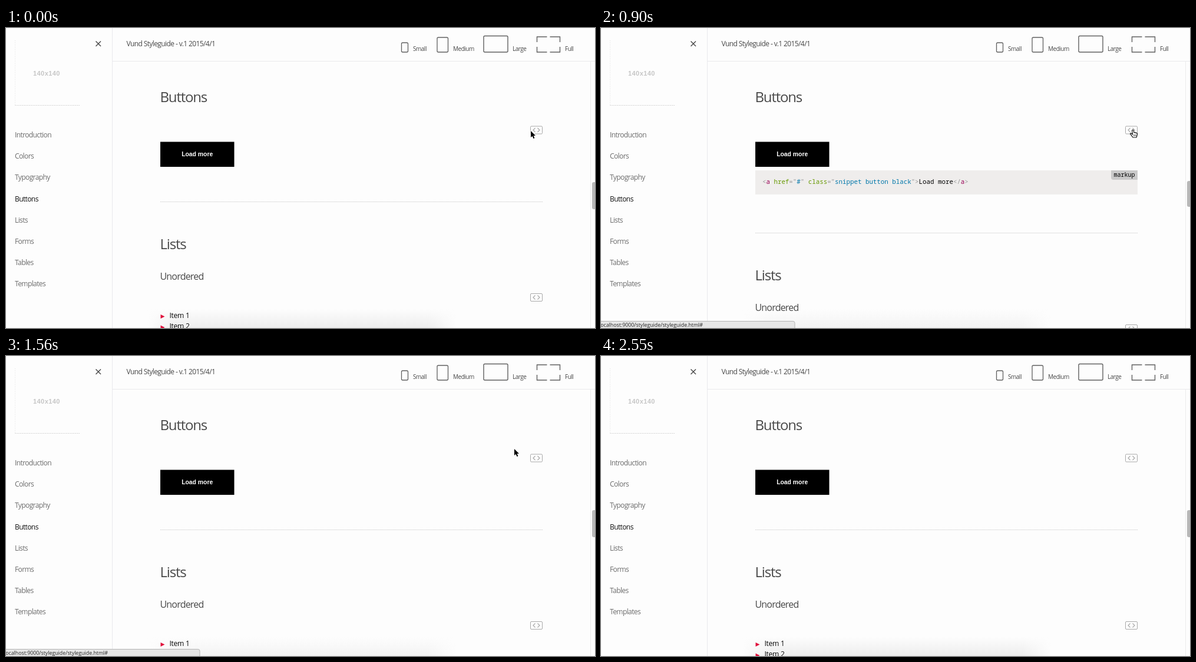
Animation of 1000 by 510 pixels, one loop 2.58 s. Source, as an HTML page with a canvas:

```html
<!DOCTYPE html>
<html lang="en">
<head>
<meta charset="utf-8">
<title>Styleguide</title>
<style>
  html, body { margin: 0; width: 100%; height: 100%; overflow: hidden; background: #fdfdfd; }
  canvas { display: block; }
</style>
</head>
<body>
<canvas id="stage" width="1000" height="510"></canvas>
<script>
const W = 1000, H = 510, LOOP = 2580, STEP = 30;
const OPEN = 450, CLOSE = 1410;
const STATUS_IN = 150, STATUS_OUT = 1680, FADE = 120;
const PANEL_SHIFT = 53;
const UI = '"Open Sans", "Noto Sans", sans-serif';
const ARIAL = '"Liberation Sans", Arial, sans-serif';
const MONO = '"Noto Sans Mono", "DejaVu Sans Mono", monospace';
const PAGE = '#fdfdfd', LINE = '#e9e9ec', INK = '#484848';

// time, x, y of the pointer's hot spot
const POINTER = [
  [0, 891, 175], [90, 898, 174], [360, 900, 173], [900, 903, 173],
  [1260, 900, 172], [1470, 897, 171], [1560, 863, 158],
  [1620, 842, 88], [1680, 826, -20]
];

const ctx = document.getElementById('stage').getContext('2d');

const clamp = v => Math.min(1, Math.max(0, v));

function box(x, y, w, h, color) {
  ctx.fillStyle = color;
  ctx.fillRect(x, y, w, h);
}

function text(str, x, y, size, color, { font = UI, weight = 400, track = -0.05, align = 'left' } = {}) {
  ctx.font = `${weight} ${size}px ${font}`;
  ctx.letterSpacing = `${track * size}px`;
  ctx.textAlign = align;
  ctx.fillStyle = color;
  ctx.fillText(str, x, y);
}

function line(points, color, width = 1, dash = []) {
  ctx.beginPath();
  points.forEach(([x, y]) => ctx.lineTo(x, y));
  ctx.setLineDash(dash);
  ctx.strokeStyle = color;
  ctx.lineWidth = width;
  ctx.stroke();
  ctx.setLineDash([]);
}

function frame(x, y, w, h, r, color, width) {
  ctx.beginPath();
  ctx.roundRect(x, y, w, h, r);
  ctx.strokeStyle = color;
  ctx.lineWidth = width;
  ctx.stroke();
}

function drawSidebar() {
  line([[180.5, 0], [180.5, H]], LINE);
  line([[15.5, 21], [15.5, 131]], '#e2e2e2', 1, [1, 2]);
  line([[15, 131.5], [125, 131.5]], '#d6d6d6', 1, [2, 1]);
  text('140x140', 46, 80.5, 11, '#c6c6c6', { font: ARIAL, weight: 700, track: 0.04 });
  line([[152.5, 22.5], [161, 31]], INK, 1.4);
  line([[161, 22.5], [152.5, 31]], INK, 1.4);
  ['Introduction', 'Colors', 'Typography', 'Buttons', 'Lists', 'Forms', 'Tables', 'Templates']
    .forEach((name, i) => {
      const active = name === 'Buttons';
      text(name, 15, 186 + i * 36.2, 12, active ? '#111' : '#6c6c6c', { weight: active ? 500 : 400 });
    });
}

function drawHeader() {
  line([[181, 56.5], [W, 56.5]], LINE);
  text('Vund Styleguide - v.1 2015/4/1', 204.5, 31, 12, INK);
  const edge = '#606060';
  frame(671.5, 25, 11, 16, 2, edge, 1.3);
  frame(732, 16, 18.5, 25, 2, edge, 1.3);
  frame(811, 13.5, 41, 27.5, 2, edge, 1.4);
  for (const [x, dx] of [[901.5, 1], [940.5, -1]]) {
    for (const [y, dy] of [[15, 1], [41, -1]]) {
      line([[x + dx * 17, y], [x, y], [x, y + dy * 9]], edge, 1.4);
    }
  }
  [['Small', 691], ['Medium', 759], ['Large', 860], ['Full', 949]]
    .forEach(([name, x]) => text(name, x, 38.5, 10, INK));
}

function drawGlow(strength) {
  const down = ctx.createLinearGradient(0, 478, 0, H);
  down.addColorStop(0, 'rgba(226,226,226,0)');
  down.addColorStop(1, `rgba(226,226,226,${0.6 * strength})`);
  box(240, 478, 525, 32, down);
  // soften both ends into the page colour
  for (const [from, to] of [[240, 290], [765, 715]]) {
    const side = ctx.createLinearGradient(from, 0, to, 0);
    side.addColorStop(0, PAGE);
    side.addColorStop(1, 'rgba(253,253,253,0)');
    box(Math.min(from, to), 478, Math.abs(to - from), 32, side);
  }
}

function drawCodeIcon(y) {
  const gray = '#a9a9a9';
  frame(890.5, y - 6.5, 20, 13, 1.5, gray, 1);
  line([[898.5, y - 3.5], [895, y], [898.5, y + 3.5]], gray, 1.2);
  line([[902.5, y - 3.5], [906, y], [902.5, y + 3.5]], gray, 1.2);
}

function drawPanel() {
  box(262, 242, 649, 41, '#efedec');
  ctx.beginPath();
  ctx.roundRect(866, 242, 45, 16, [0, 0, 0, 4]);
  ctx.fillStyle = '#c9c9c9';
  ctx.fill();
  text('markup', 870.5, 253, 10, '#000', { font: MONO, track: 0 });

  const punct = '#999', tag = '#990055', attr = '#669900', value = '#0077aa';
  const parts = [
    ['<', punct], ['a', tag], [' href', attr], ['="', punct], ['#', value], ['"', punct],
    [' class', attr], ['="', punct], ['snippet button black', value], ['">', punct],
    ['Load more', '#000'], ['</', punct], ['a', tag], ['>', punct]
  ];
  let x = 274;
  for (const [str, color] of parts) {
    text(str, x, 264.5, 10.8, color, { font: MONO, track: 0 });
    x += ctx.measureText(str).width;
  }
}

function drawContent(open) {
  const shift = open ? PANEL_SHIFT : 0;
  text('Buttons', 261.5, 126, 24, INK);
  drawCodeIcon(173.5);
  box(262, 193.5, 125.5, 42.5, '#000');
  text('Load more', 324.7, 218, 10.4, '#fff', { font: ARIAL, weight: 700, track: 0, align: 'center' });
  if (open) drawPanel();

  line([[262, 295.5 + shift], [911, 295.5 + shift]], '#c6c6c6', 1, [1, 1]);
  text('Lists', 261.5, 376 + shift, 24, INK);
  text('Unordered', 261.5, 428 + shift, 16, INK);
  drawCodeIcon(458 + shift);
  for (let i = 0; i < 2; i++) {
    const y = 490.5 + shift + i * 18.5;
    ctx.beginPath();
    ctx.moveTo(262.5, y - 3.5);
    ctx.lineTo(269.5, y);
    ctx.lineTo(262.5, y + 3.5);
    ctx.fillStyle = '#e0103c';
    ctx.fill();
    text('Item ' + (i + 1), 277.5, y + 2.3, 12.2, '#080808', { track: -0.025 });
  }
}

function drawScrollbar(open) {
  line([[992.5, 56], [992.5, H]], '#ececec');
  ctx.beginPath();
  ctx.roundRect(995, open ? 260 : 262, 7, open ? 44 : 46, 3);
  ctx.fillStyle = '#b8b8b8';
  ctx.fill();
}

function drawStatus(alpha) {
  ctx.globalAlpha = alpha;
  ctx.beginPath();
  ctx.roundRect(-2, 498.5, 331, 14, [0, 3, 0, 0]);
  ctx.fillStyle = '#e6e6e6';
  ctx.fill();
  ctx.strokeStyle = '#b4b4b4';
  ctx.lineWidth = 1;
  ctx.stroke();
  text('localhost:9000/styleguide/styleguide.html#', 173, 508, 8.8, '#222', { track: 0, align: 'right' });
  ctx.globalAlpha = 1;
}

function pointerAt(t) {
  const i = POINTER.findIndex(p => p[0] > t);
  if (i < 0) return null;
  const [t0, x0, y0] = POINTER[i - 1], [t1, x1, y1] = POINTER[i];
  const k = (t - t0) / (t1 - t0);
  return [x0 + (x1 - x0) * k, y0 + (y1 - y0) * k];
}

const ARROW = new Path2D('M0 0V11L2.6 8.7L4.5 13L6.4 12.2L4.6 8H8Z');
const HAND = new Path2D(
  'M-1.4 1Q0 -1 1.2 1L2 5Q3.2 3.9 4 5.2Q5.2 4.2 6 5.8Q7.6 5.2 7.6 7.2' +
  'L7 10L6 13H0L-2.6 9.4L-4.4 7.2Q-4.2 5 -2 6.6L-0.4 8Z'
);

function drawPointer(t) {
  const at = pointerAt(t);
  if (!at) return;
  const [x, y] = at;
  const hover = x > 892 && y > 166;
  ctx.save();
  ctx.translate(x, y);
  ctx.lineJoin = 'round';
  if (hover) {
    ctx.fillStyle = '#fff';
    ctx.fill(HAND);
    ctx.strokeStyle = '#111';
    ctx.lineWidth = 1.2;
    ctx.stroke(HAND);
    for (const dx of [1.6, 3.4, 5.2]) line([[dx, 8], [dx, 10.8]], '#111', 0.7);
  } else {
    ctx.strokeStyle = '#fff';
    ctx.lineWidth = 1.6;
    ctx.stroke(ARROW);
    ctx.fillStyle = '#000';
    ctx.fill(ARROW);
  }
  ctx.restore();
}

function draw(now) {
  const t = Math.floor((now % LOOP) / STEP) * STEP;
  const open = t >= OPEN && t < CLOSE;
  const status = clamp((t - STATUS_IN) / FADE) * clamp((STATUS_OUT + FADE - t) / FADE);
  box(0, 0, W, H, PAGE);
  drawGlow(1 - 0.4 * status);
  drawSidebar();
  drawHeader();
  drawContent(open);
  drawScrollbar(open);
  if (status > 0) drawStatus(status);
  drawPointer(t);
}

let start;
function tick(now) {
  start ??= now;
  draw(now - start);
  requestAnimationFrame(tick);
}
draw(0);
requestAnimationFrame(tick);
</script>
</body>
</html>
```
